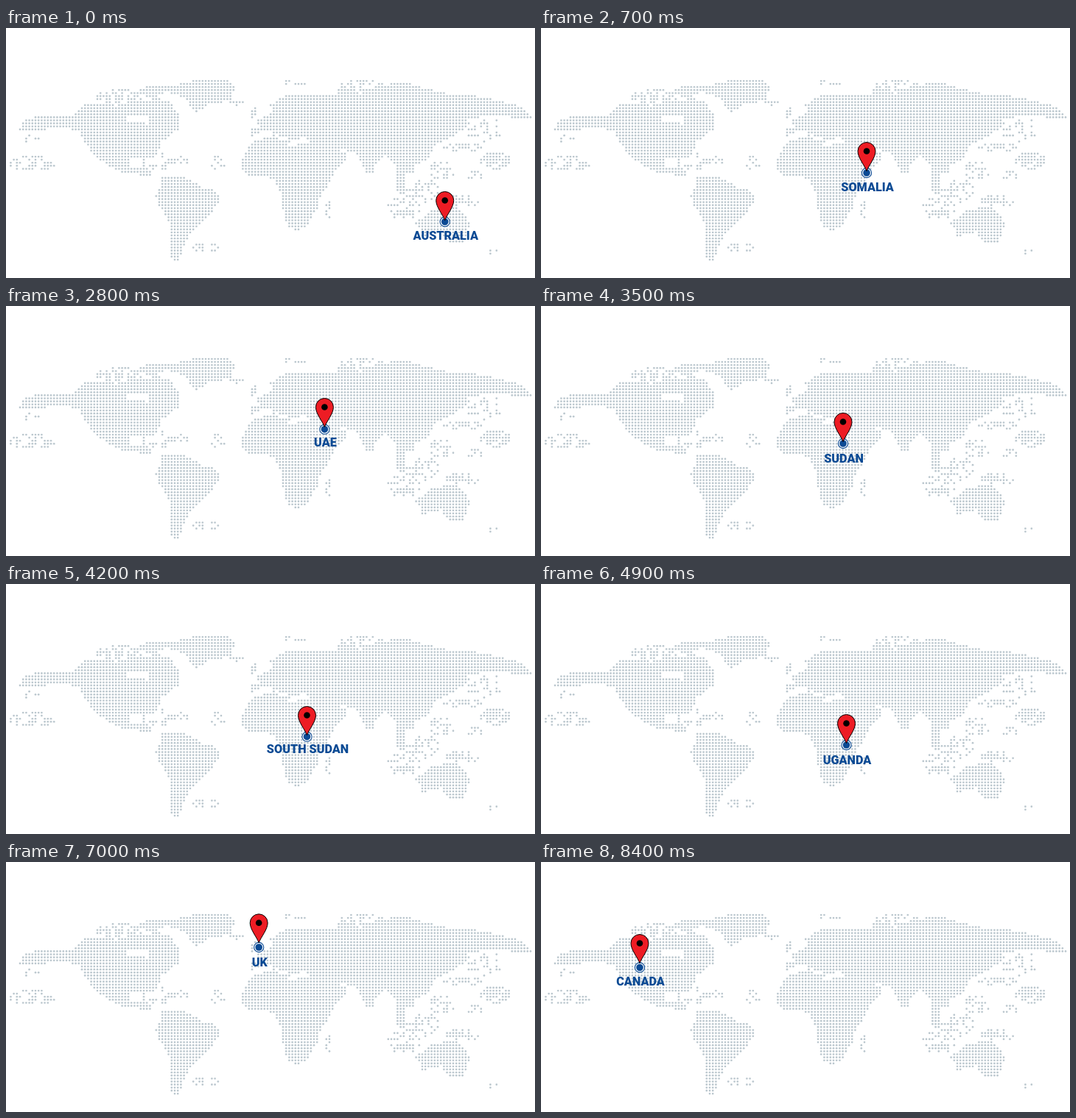
Write an HTML page with a canvas that moves like this. It is 718 px wide and 340 px high and loops after 9.1 s.

```html
<!DOCTYPE html>
<html lang="en">
<head>
<meta charset="utf-8">
<title>Countries on a dotted map</title>
<style>
  html, body { margin: 0; width: 100%; height: 100%; overflow: hidden; background: #fff; }
  canvas, svg { position: absolute; left: 0; top: 0; }
  text { font: 900 16.2px Roboto, sans-serif; text-anchor: middle; fill: #0b4a94; }
</style>
</head>
<body>
<canvas id="map" width="718" height="340"></canvas>
<svg width="718" height="340">
  <g id="spot">
    <circle r="6.6" fill="#fff" stroke="#0b4a94" stroke-width="1.1"/>
    <circle r="4.8" fill="#0b4a94"/>
  </g>
  <g id="pin">
    <path d="M0 39C-3 31-12 21-12 12A12 12 0 0 1 12 12C12 21 3 31 0 39Z"
          fill="#ed1c24" stroke="#000"/>
    <circle cy="12" r="4.3"/>
  </g>
  <text id="label"></text>
</svg>
<script>
const STEP = 700;
const PITCH_X = 4.2, PITCH_Y = 4.12;

// name, x, pin top, spot y, label baseline
const stops = [
  ['AUSTRALIA', 595.7, 222.5, 263.5, 287.5],
  ['SOMALIA', 442, 155.5, 197, 221.5],
  ['KENYA', 427, 168, 209, 234.7],
  ['ETHIOPIA', 422, 149.5, 190.5, 215.5],
  ['UAE', 432.4, 125.5, 167.7, 191],
  ['SUDAN', 410, 145.5, 187, 212.5],
  ['SOUTH SUDAN', 408.5, 166.5, 207.7, 229.7],
  ['UGANDA', 414.5, 177.5, 219, 244.5],
  ['SWEDEN', 386.2, 65.8, 107.8, 133],
  ['NORWAY', 369.5, 63.5, 105.5, 130.5],
  ['UK', 343.2, 70.8, 116, 141.5],
  ['USA', 153.5, 117, 162, 187.5],
  ['CANADA', 134, 98.5, 143.5, 168],
];

const coasts = {
  northAmerica: `M18 139L24 127 40 120 88 120 108 103 150 105 200 98 222 101 235 119 236 136
    212 154 206 168 200 176 168 179 166 188 195 192 198 203 152 195 118 173 100 142 88 137Z`,
  greenland: 'M190 78L222 80 260 70 299 70 312 80 304 99 276 104 256 116 244 96 220 88 190 90Z',
  southAmerica: `M208 202L238 201 268 217 287 222 290 233 280 251 248 284 233 317 225 316
    223 280 221 263 206 238 203 227 209 218Z`,
  africaAndArabia: `M319 192L319 179 334 156 350 149 370 149 385 161 418 153 440 160 463 171
    460 183 448 191 437 214 425 231 425 241 408 270 394 275 381 268 374 241 376 230 364 205
    325 199Z`,
  eurasia: `M332 148L332 138 344 135 340 125 362 114 357 105 382 90 450 91 452 79 480 90
    500 83 525 75 544 75 590 87 606 92 636 92 692 104 714 119 713 124 660 119 629 123
    622 138 583 160 574 178 556 186 552 198 540 196 540 226 531 223 528 186 515 173 500 188
    499 199 491 199 476 171 440 161 418 157 412 148 384 151 354 139Z`,
  australia: `M555 266L578 247 609 243 618 249 630 266 621 292 600 292 590 277 562 284 564 274Z`,
};
const hudsonBay = new Path2D('M162 127L164 120 190 117 195 124 194 130Z');

// Island groups: centre, radii, share of dots filled
const islands = [
  [36, 184, 32, 10, .55], [35, 150, 10, 8, .35],   // North Pacific
  [165, 94, 46, 11, .65],                          // Arctic Canada
  [215, 182, 32, 13, .35],                         // Caribbean
  [288, 183, 14, 10, .3], [270, 299, 18, 8, .4],   // Atlantic
  [313, 101, 10, 4, .9], [338, 115, 8, 9, .55],    // Iceland, Britain
  [395, 74, 22, 3, .5], [480, 80, 42, 9, .6],      // Arctic Ocean
  [385, 147, 32, 8, .4], [438, 248, 5, 12, .8],    // Mediterranean, Madagascar
  [650, 138, 26, 19, .3], [620, 162, 28, 7, .6],   // Japan
  [664, 180, 21, 12, .75], [638, 200, 12, 8, .6],  // West Pacific
  [592, 193, 17, 17, .45], [618, 236, 23, 9, .6],  // Philippines, New Guinea
  [565, 222, 24, 17, .5], [540, 245, 24, 15, .45], // Indonesia
  [660, 303, 7, 8, .45],                           // New Zealand
];

function seeded(seed) {
  return () => (seed = seed * 16807 % 2147483647) / 2147483647;
}

function drawMap() {
  const ctx = document.getElementById('map').getContext('2d');
  const land = Object.values(coasts).map(path => new Path2D(path));
  const random = seeded(41);

  const isLand = (x, y) =>
    land.some(path => ctx.isPointInPath(path, x, y)) && !ctx.isPointInPath(hudsonBay, x, y);
  const isIsland = (x, y) => islands.some(([cx, cy, rx, ry, share]) =>
    Math.hypot((x - cx) / rx, (y - cy) / ry) < 1 && random() < share);

  ctx.fillStyle = '#bbc7ce';
  for (let y = 72; y < 317; y += PITCH_Y) {
    for (let x = 6.4; x < 713; x += PITCH_X) {
      if (!isLand(x, y) && !isIsland(x, y)) continue;
      ctx.beginPath();
      ctx.arc(x, y, 1.35, 0, Math.PI * 2);
      ctx.fill();
    }
  }
}

const [spot, pin, label] = ['spot', 'pin', 'label'].map(id => document.getElementById(id));
const place = (node, x, y) => node.setAttribute('transform', `translate(${x} ${y})`);

function frame() {
  const index = Math.floor(performance.now() / STEP) % stops.length;
  const [name, x, pinTop, spotY, baseline] = stops[index];
  place(spot, x, spotY);
  place(pin, x, pinTop);
  place(label, x + 1, baseline);
  label.textContent = name;
  requestAnimationFrame(frame);
}

drawMap();
frame();
</script>
</body>
</html>
```
